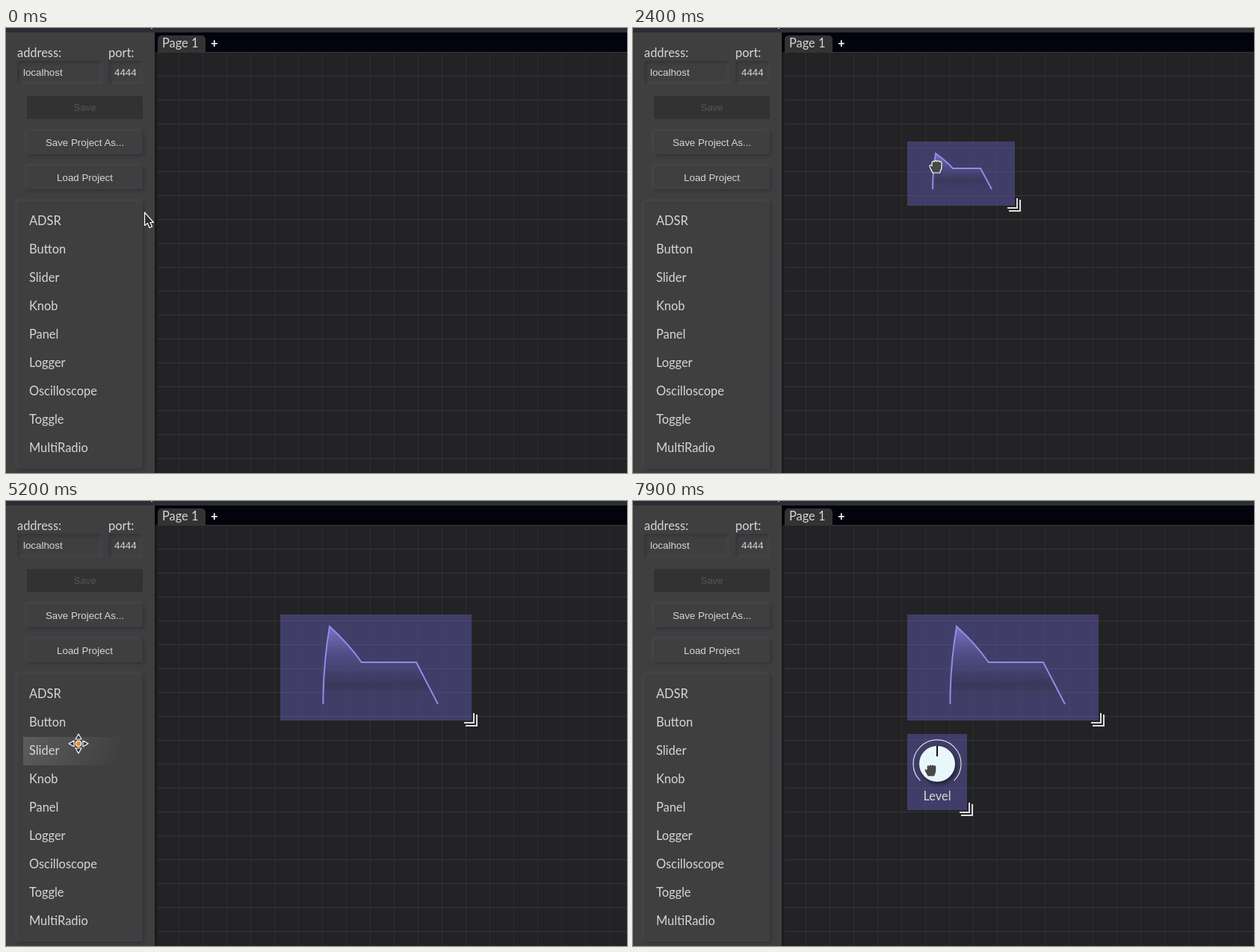
An HTML page that plays this animation: 831x596 px, repeating every 8000 ms.

```html
<!DOCTYPE html>
<html lang="en">
<head>
<meta charset="utf-8">
<title>Widget editor</title>
<style>
html, body { margin: 0; width: 100%; height: 100%; overflow: hidden; background: #232325; }
body { position: relative; font: 16.4px/20px Lato, sans-serif; color: #d6d6d6; }
body *, svg { position: absolute; box-sizing: border-box; white-space: nowrap; }
svg { overflow: visible; left: 0; top: 0; }
svg * { position: static; }
#top { left: 0; top: 0; width: 100%; height: 6px; background: #2b2e33; }
#top i { left: 194px; top: 0; width: 2px; height: 1px; background: #ccc; }
#tabs { left: 199px; top: 6px; right: 0; height: 26px; background: #03030d; }
#tab { left: 4px; top: 4px; width: 64px; height: 22px; padding-left: 6px; background: #333334; border-radius: 5px 5px 0 0; }
#plus { left: 75px; top: 4px; font-weight: 700; color: #fff; }
#grid {
  left: 203px; top: 32px; right: 0; bottom: 0;
  background:
    repeating-linear-gradient(#363638 0 1px, transparent 1px 32px),
    repeating-linear-gradient(90deg, transparent 0 28px, #2d2d2f 28px 29px, transparent 29px 32px), #232325;
}
#edge { left: 199px; top: 32px; width: 4px; bottom: 0; background: linear-gradient(90deg, #17171a, #222224); }
#side { left: 0; top: 6px; width: 199px; bottom: 0; background: #3f3f3f; }
.field, .btn { height: 31px; font: 13.333px/31px "Liberation Sans", Arial, sans-serif; }
.field { top: 38px; padding-left: 8px; border-radius: 3px; box-shadow: inset 2px 2px 4px #32323f, inset -2px -2px 4px #484850; }
.btn { left: 28px; width: 155px; text-align: center; border-radius: 2px; }
.btn, #list { box-shadow: 2px 2px 4px #303040, -2px -2px 4px #4a4a54; }
.btn.off { background: #323232; color: #565656; box-shadow: none; }
#list { left: 15px; top: 226px; width: 168px; height: 358px; border-radius: 2px; }
.item { left: 8px; width: 152px; height: 38px; padding-left: 8px; line-height: 36px; }
.item.hover { background: linear-gradient(110deg, #5c5c5c, #3f3f3f 85%); }
.item.active::before {
  content: ""; position: absolute; z-index: -1; inset: 2px 0 1px 2px; border-radius: 3px;
  background: linear-gradient(110deg, #505050, #3f3f3f 70%);
  box-shadow: inset 2px 2px 4px #34343e, inset -2px -2px 4px #484856;
}
.item.active { z-index: 0; }
#ghost { left: 0; top: 0; background: linear-gradient(100deg, #464646, #343435 75%); color: #a9a9a9; }
.tip { left: 184px; height: 22px; padding: 0 8px; border-radius: 4px; background: #e6e6e6; color: #000; font-size: 14px; line-height: 20px; }
.widget { left: 0; top: 0; background: rgba(101, 96, 187, .45); }
.grip, .grip::after { width: 16px; height: 16px; border: solid #dedede; border-width: 0 2px 2px 0; }
.grip { right: -8px; bottom: -8px; }
.grip::after { content: ""; position: absolute; right: 2px; bottom: 2px; width: 12px; height: 12px; }
#knob { width: 80px; height: 102px; }
#knob span { top: 73px; width: 80px; text-align: center; }
#cursor { width: 1px; height: 1px; }
</style>
</head>
<body>
<div id="tabs"><div id="tab">Page 1</div><div id="plus">+</div></div>
<div id="grid"></div><div id="edge"></div>

<div class="widget" id="adsr">
  <svg width="1" height="1">
    <defs><linearGradient id="fade" x1="0" y1="0" x2="0" y2="1">
      <stop offset="0" stop-color="#8a85e0" stop-opacity=".8"/>
      <stop offset=".38" stop-color="#5d59a0" stop-opacity=".5"/>
      <stop offset=".75" stop-color="#33324c" stop-opacity=".5"/>
      <stop offset="1" stop-color="#403d66" stop-opacity="0"/>
    </linearGradient></defs>
    <path id="curve" fill="url(#fade)" stroke="#908ce6" stroke-width="2"/>
  </svg>
  <i class="grip"></i>
</div>

<div class="widget" id="knob">
  <svg width="1" height="1">
    <path d="M17.4 62.6A32 32 0 1 1 62.6 62.6" fill="none" stroke="#dcdce8" stroke-width="1.2"/>
    <circle cx="40" cy="40" r="24" fill="#e8f8fa" style="filter:drop-shadow(2px 3px 3px #0008)"/>
    <path d="M40 16V30" stroke="#111" stroke-width="2"/>
  </svg>
  <span>Level</span><i class="grip"></i>
</div>

<div class="tip" id="tipAdsr" style="top:248px">Classic ADSR controls</div>
<div class="tip" id="tipKnob" style="top:362px">Simple knob</div>

<div id="side">
  <span style="left:15px;top:17px">address:</span><span style="left:137px;top:17px">port:</span>
  <div class="field" style="left:15px;width:114px">localhost</div>
  <div class="field" style="left:137px;width:46px">4444</div>
  <div class="btn off" style="top:85px">Save</div>
  <div class="btn" style="top:132px">Save Project As...</div>
  <div class="btn" style="top:179px">Load Project</div>
  <div id="list"></div>
</div>
<div id="top"><i></i></div>
<div class="item" id="ghost"></div>

<svg id="cursor">
  <g id="arrow">
    <path d="M.5 0V17.5L4.5 14.5L7 20.5L10.5 19L8 13.5H12.5Z" fill="#2c2c2e" stroke="#fff" stroke-width="1.2" stroke-linejoin="round"/>
    <g id="badge">
      <circle cx="17" cy="19.5" r="6" fill="#1fc41f" stroke="#fff" stroke-width="1.1"/>
      <path d="M13.5 19.5h7M17 16v7" stroke="#fff" stroke-width="1.2"/>
    </g>
  </g>
  <g id="move" fill="#333" stroke="#fff" stroke-width="1.2" stroke-linejoin="round">
    <path id="tri" d="M0-13L4-6H-4Z"/>
    <use href="#tri" transform="rotate(90)"/><use href="#tri" transform="rotate(180)"/><use href="#tri" transform="rotate(270)"/>
    <circle r="3.8" fill="#f08a24"/>
  </g>
  <path id="hand" d="M-4 9C-5 6-8 3-8 0C-8-2-6-2-5 0V-5q1.5-3 3.2-.8q1.8-3 3.4-.4q2-2.2 3.4.3q2.4-1.4 3 1.2V1C8 5 6 6 5.5 9Z" fill="#484846" stroke="#fff" stroke-width="1.2"/>
</svg>

<script>
const $ = id => document.getElementById(id);
const LOOP = 8000, STEP = 100, CELL = 16, ROW = 38;
const names = ["ADSR", "Button", "Slider", "Knob", "Panel", "Logger", "Oscilloscope", "Toggle", "MultiRadio"];
const items = names.map((name, i) => {
  const el = document.createElement("div");
  el.className = "item";
  el.textContent = name;
  el.style.top = 8 + i * ROW + "px";
  $("list").append(el);
  return el;
});

// Pointer path: time, x, y
const path = [
  [0, 185, 247], [200, 164, 295], [400, 115, 344], [600, 88, 285], [700, 83, 255], [800, 88, 252],
  [900, 118, 244], [1200, 224, 221], [1600, 324, 208], [1700, 326, 212], [1800, 357, 249], [2400, 405, 185],
  [2800, 405, 185], [3300, 480, 225], [3700, 531, 253], [3900, 562, 284], [4000, 570, 291],
  [4200, 410, 322], [4400, 178, 356], [4500, 178, 356], [4700, 148, 425], [4900, 112, 466],
  [5200, 97, 325], [5300, 97, 318], [5400, 97, 370], [5700, 97, 400], [6000, 96, 380], [6200, 97, 373],
  [6300, 124, 374], [6500, 340, 380], [6700, 368, 381], [6900, 370, 381], [7100, 398, 424],
  [7200, 398, 408], [7700, 398, 360], [8000, 398, 360]
];
const drags = [
  { from: 800, to: 1700, item: 0, dx: -60, dy: -15 },
  { from: 6250, to: 6850, item: 3, dx: -74, dy: -19 }
];

const between = (t, a, b) => t >= a && t <= b;
const clamp01 = v => Math.min(1, Math.max(0, v));
const snap = v => Math.round(v / CELL) * CELL;
const show = (el, on) => { el.style.display = on ? "" : "none"; };
const place = (el, x, y) => { el.style.transform = `translate(${x}px,${y}px)`; };

function pointer(t) {
  const i = path.findIndex(k => k[0] > t);
  const [t0, x0, y0] = path[i - 1], [t1, x1, y1] = path[i];
  const p = (t - t0) / (t1 - t0);
  return [Math.round(x0 + (x1 - x0) * p), Math.round(y0 + (y1 - y0) * p)];
}

function envelope(w, h) {
  const x0 = 4 + .2087 * w, x1 = 2 + .25 * w, x2 = .427 * w - .5, x3 = .75 * w - 10, x4 = .875 * w - 13;
  const top = 16, mid = h / 2 - 7, low = h - 22;
  return `M${x0} ${low}Q${x0} ${(top + low) / 2} ${x1} ${top}` +
    `Q${x1 + (x2 - x1) * .57} ${top + (mid - top) * .46} ${x2} ${mid}H${x3}L${x4} ${low}`;
}

function drawAdsr(t, x, y) {
  show($("adsr"), t >= 1800);
  const move = t < 2400;
  place($("adsr"), move ? 319 + snap(x - 357) : 367, move ? 216 + snap(y - 249) : 152);
  const grow = t < 3800 ? 0 : t < 3900 ? 48 : t < 4000 ? 96 : 112;
  const w = 144 + grow, h = 86 + grow / 2;
  $("adsr").style.width = w + "px";
  $("adsr").style.height = h + "px";
  $("curve").setAttribute("d", envelope(w, h));
}

function drawKnob(t, y) {
  show($("knob"), t >= 6900);
  place($("knob"), 367, t < 7100 ? 376 : 376 + snap(y - 424));
}

function draw(t) {
  const [x, y] = pointer(t);
  const drag = drags.find(d => between(t, d.from, d.to));
  const row = Math.floor((y - 240) / ROW);
  const over = !drag && between(x, 23, 175) && items[row] ? row : -1;
  const hand = between(t, 1800, 4000) || t >= 7000;

  items.forEach((el, i) => {
    el.classList.toggle("hover", i === over);
    el.classList.toggle("active", !!drag && i === drag.item);
  });
  show($("ghost"), drag);
  if (drag) {
    $("ghost").textContent = names[drag.item];
    place($("ghost"), x + drag.dx, y + drag.dy);
  }
  $("tipAdsr").style.opacity = t < 1900 ? .8 * clamp01((t - 1000) / 500) : 0;
  $("tipKnob").style.opacity = t < 7200 ? .8 * clamp01((t - 6400) / 600) : 0;

  drawAdsr(t, x, y);
  drawKnob(t, y);

  place($("cursor"), x, y);
  show($("hand"), hand);
  show($("move"), !hand && over >= 0);
  show($("arrow"), !hand && over < 0);
  show($("badge"), drag && x > 203);
}

const start = performance.now();
function tick() {
  const t = (performance.now() - start) % LOOP;
  draw(Math.floor(t / STEP) * STEP);
  requestAnimationFrame(tick);
}
tick();
</script>
</body>
</html>
```
